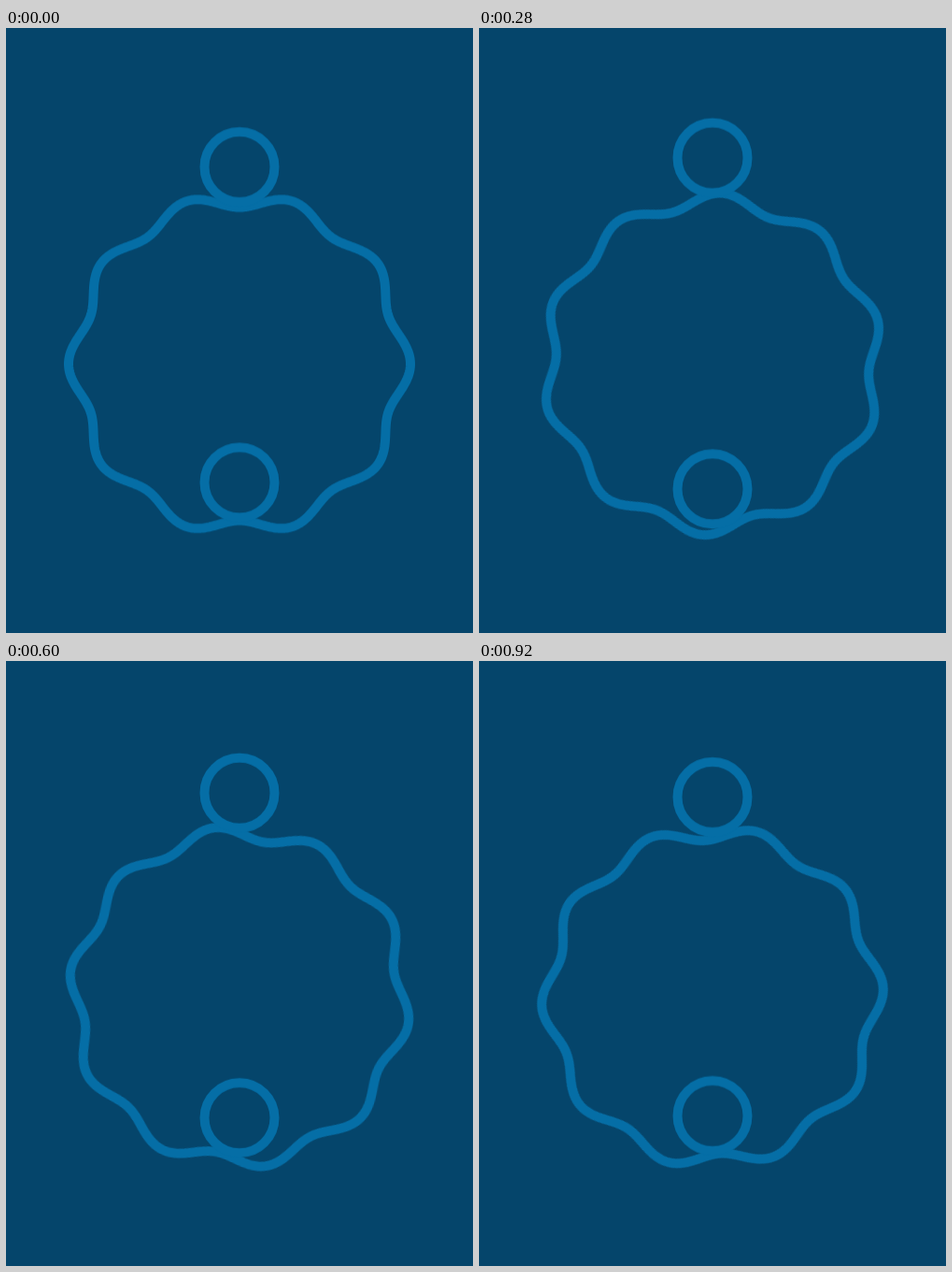
An HTML page for the animation above (0.96 s loop, 500 px wide and 647 px high).

```html
<!DOCTYPE html>
<html lang="en">
<head>
<meta charset="utf-8">
<title>Circles on a turning wave</title>
<style>
  html, body { margin: 0; width: 100%; height: 100%; overflow: hidden; background: #05456b; }
  svg { display: block; width: 100vw; height: 100vh; }
  .lines { fill: none; stroke: #056ea6; stroke-width: 10; stroke-linejoin: round; }
</style>
</head>
<body>
<svg viewBox="0 0 500 647">
  <g class="lines" transform="translate(250 359.3)">
    <path id="wave"/>
    <circle id="rider" cy="-210.8" r="37.5"/>
    <circle id="inner" cy="126.7" r="37.5"/>
  </g>
</svg>
<script>
  const LOBES = 10, RADIUS = 175.25, SWELL = 7.75;
  const STEPS = 12, STEP_MS = 40, TRAVEL = 10;
  const $ = id => document.getElementById(id);

  const points = Array.from({ length: 720 }, (_, i) => {
    const a = i * Math.PI / 360;
    const r = RADIUS + SWELL * Math.cos(LOBES * a);
    return (r * Math.cos(a)).toFixed(2) + ' ' + (r * Math.sin(a)).toFixed(2);
  });
  $('wave').setAttribute('d', 'M' + points.join('L') + 'Z');

  // Each pose is held for one step; the wave advances one lobe per cycle.
  function play(id, pose) {
    const frames = Array.from({ length: STEPS + 1 }, (_, k) => ({
      offset: k / STEPS,
      transform: pose(k / STEPS),
      easing: 'step-end'
    }));
    const anim = $(id).animate(frames, { duration: STEPS * STEP_MS, iterations: Infinity });
    anim.startTime = document.timeline.currentTime;
  }

  const rise = t => 1 - Math.abs(2 * t - 1);
  const easeIn = x => x * x;
  const easeOut = x => 1 - easeIn(1 - x);
  const moveY = y => `translate(0px, ${y}px)`;

  play('wave', t => `rotate(${t * 360 / LOBES}deg)`);
  play('rider', t => moveY(-TRAVEL * easeOut(rise(t))));
  play('inner', t => moveY(TRAVEL * easeIn(rise(t))));
</script>
</body>
</html>
```
